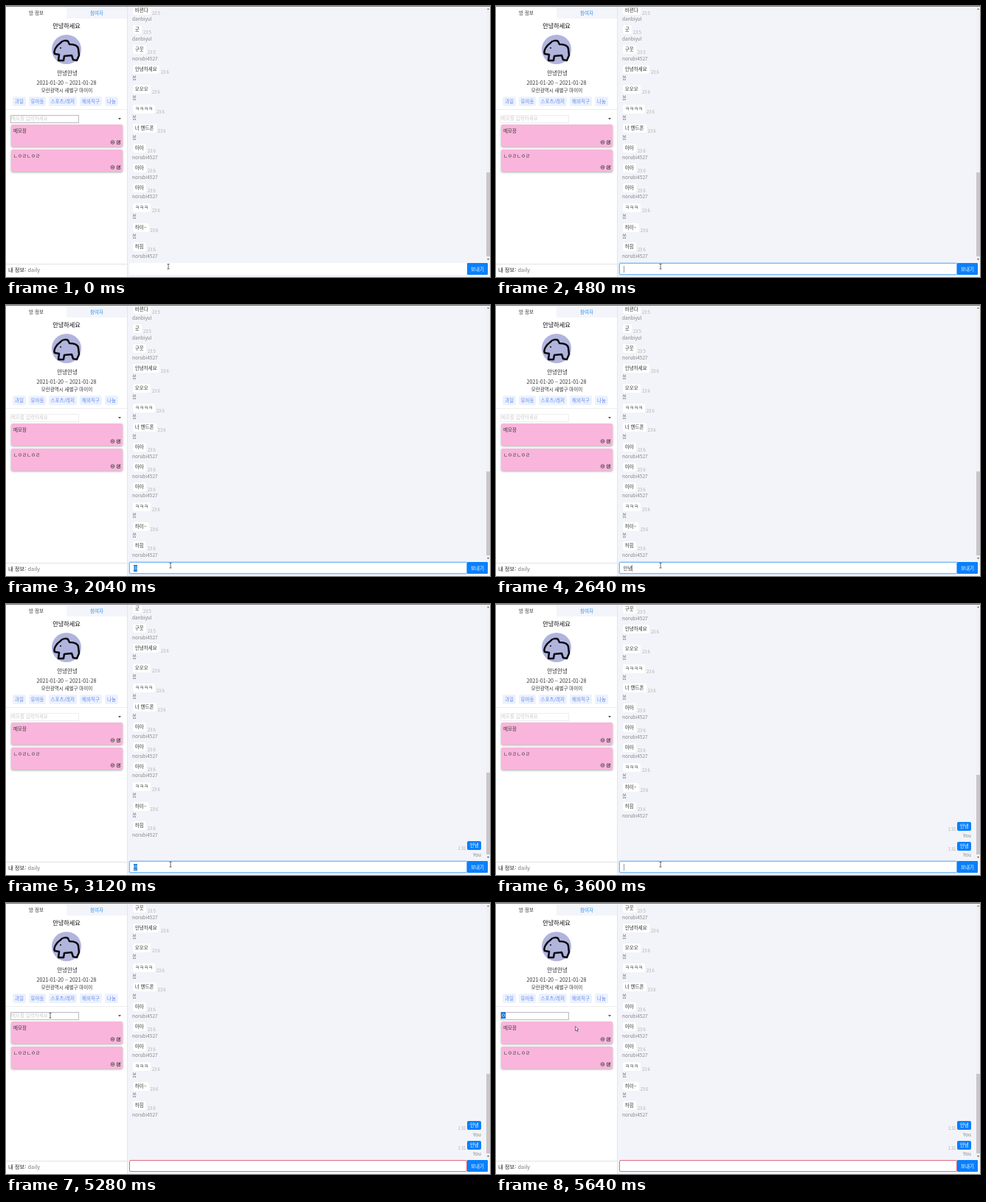
Animation of 656 by 368 pixels, one loop 5.76 s. Source, as an HTML page:

```html
<!DOCTYPE html>
<html lang="ko">
<head>
<meta charset="utf-8">
<title>Chat room</title>
<style>
html, body { margin: 0; width: 100%; height: 100%; overflow: hidden; background: #fff; }
#stage { position: relative; width: 656px; height: 368px; overflow: hidden; background: #fff;
  font: 6.5px/11px "Noto Sans CJK KR", "Noto Sans CJK", "Noto Sans", sans-serif; color: #333; }
#stage div, #stage svg { position: absolute; box-sizing: border-box; white-space: pre; }
#stage .mid { transform: translateX(-50%); }
.tag { height: 13px; padding: 0 3px; border-radius: 2px; background: #ecf2fe; color: #6489ec; line-height: 12px; }
.memo { left: 7px; width: 151px; height: 30px; background: #f9b5db; border-radius: 2px; box-shadow: 0 1px 3px #0005; }
#chat { left: 165px; top: 1px; width: 486px; height: 346px; overflow: hidden; }
#list { left: -165px; top: -1px; width: 656px; height: 400px; }
.bubble { height: 12px; padding: 0 3.3px; background: #fff; border-radius: 2px; box-shadow: 0 0 1px #0001; }
#stage .line { position: absolute; display: flex; left: 171.5px; height: 12px; }
#stage .line > div { position: static; }
.time { font-size: 5.5px; line-height: 20px; color: #aaa; margin: 0 2px; }
.name { left: 171px; color: #858585; }
#stage .own { left: auto; right: 12px; flex-direction: row-reverse; }
.own .bubble { background: #0a80fb; color: #fff; }
.name.own { left: auto; right: 12px; }
#field { left: 167px; top: 349px; width: 458px; height: 16px; border: 1px solid #fff; border-radius: 2px; background: #fff; }
#stage .sel { background: #1979d2; color: #fff; }
#stage .caret { border-right: 1px solid #999; }
#memoBox { left: 6px; top: 147.5px; width: 93px; height: 11px; border: 1px solid #eee; }
</style>
</head>
<body>
<div id="stage"></div>
<script>
const LOOP = 5760, STEP = 120;
const stage = document.getElementById('stage');

function add(parent, cls, text = '', css = {}) {
  const el = document.createElement('div');
  el.className = cls;
  el.textContent = text;
  for (const k in css) el.style[k] = typeof css[k] === 'number' ? css[k] + 'px' : css[k];
  parent.append(el);
  return el;
}
const rect = (left, top, width, height, background) => add(stage, '', '', { left, top, width, height, background });
const label = (text, left, y, css = {}, cls = '') => add(stage, cls, text, { left, top: y - 6, ...css });
function draw(x, y, w, h, body) {
  const holder = add(stage, '', '', { left: x, top: y });
  holder.innerHTML = `<svg width="${w}" height="${h}" style="overflow:visible" fill="none">${body}</svg>`;
  return holder;
}

// Side panel
rect(82, 0, 82, 17, '#f3f5fa');
label('방 정보', 41, 9.5, {}, 'mid');
label('참여자', 123, 9.5, { color: '#3595ee' }, 'mid');
label('안녕하세요', 82, 26.5, { fontSize: 8.2, fontWeight: 500, color: '#111' }, 'mid');
draw(62, 39, 40, 40, `<circle cx="20" cy="20" r="20" fill="#b1b4dc"/>
  <path d="M12 11C14 8 20 7 22 9L24 13C30 13 35 14 36 19L37 28L34 35L29 34L27 28L17 29L16 35H9L10 27L4 26C2 22 6 15 12 11"
   stroke="#0b0b10" stroke-width="2.5" stroke-linejoin="round" stroke-linecap="round"/>
  <circle cx="12" cy="18" r="1" fill="#0b0b10"/>`);
label('안녕안녕', 83, 91, { fontSize: 7.5 }, 'mid');
label('2021-01-20 ~ 2021-01-28', 82, 105, { fontSize: 7.1 }, 'mid');
label('모란광역시 새별구 마이이', 82.5, 115, {}, 'mid');
[['과일', 9], ['유아동', 30.5], ['스포츠/레저', 57.5], ['해외직구', 100], ['나눔', 134]]
  .forEach(([text, left]) => add(stage, 'tag', text, { left, top: 123 }));
rect(0, 140, 164, 1, '#eee');

const memoBox = add(stage, '', '');
memoBox.id = 'memoBox';
const memoText = label('', 7, 153);
draw(151.5, 151.8, 4, 3, '<path d="M0 0H4L2 2.5Z" fill="#555"/>');

[['메모장', 161], ['ㄴㅇㄹㄴㅇㄹ', 195]].forEach(([text, top]) => {
  add(stage, 'memo', '', { top });
  label(text, 10, top + 8.5);
  draw(141, top + 20.5, 15, 6, `<g stroke="#444" stroke-width=".8"><circle cx="3.5" cy="3" r="2.4"/>
    <path d="M2.5 2L4.5 4M4.5 2L2.5 4M12.5 1H9.5V5.5H13.5V3"/><path d="M11 4L14 .7" stroke-width="1.3"/></g>`);
});
rect(0, 350, 164, 1, '#e2e2e2');
label('내 정보:', 3, 359, { fontSize: 7.3, color: '#222' });
label('daily', 29.5, 359, { fontSize: 7.3, color: '#777' });

// Chat
rect(164, 0, 492, 368, '#f2f4f9');
rect(164, 0, 1, 368, '#e3e5ea');
const chat = add(stage, '');
chat.id = 'chat';
const list = add(chat, '');
list.id = 'list';

function message(text, time, name, y, own = '') {
  const line = add(list, 'line ' + own, '', { top: y - 6 });
  add(line, 'bubble', text);
  add(line, 'time', time);
  add(list, 'name ' + own, name, { top: y + 6.5 });
}
const users = { a: 'danbiyul', b: 'norubi4527', c: '봄' };
const texts = ['바뀐다', '굿', '구웃', '안녕하세요', '오오오', 'ㅋㅋㅋㅋ', '너 핸드폰',
  '아아', '아아', '아아', 'ㅋㅋㅋ', '하이~', '하힘'];
texts.forEach((text, i) =>
  message(text, i < 3 ? '23:5' : '23:6', users['aabccccbbbccb'[i]], 5.5 + i * 26.83));
[354, 380.5].forEach(y => message('안녕', '1:31', 'You', y, 'own'));

rect(651, 1, 5, 346, '#f1f1f3');
const thumb = rect(651, 226, 5, 114, '#c9c5c9');
draw(652, 2.5, 3, 2, '<path d="M0 2H3L1.5 0Z" fill="#777"/>');
draw(652, 342.5, 3, 2, '<path d="M0 0H3L1.5 2Z" fill="#555"/>');

const field = add(stage, '');
field.id = 'field';
const fieldText = label('', 172.5, 357.5);
rect(625, 349, 28, 16, '#0a80fb').style.borderRadius = '1px';
label('보내기', 639, 357.5, { color: '#fff' }, 'mid');
rect(0, 0, 656, 1, '#77777c');

const beam = draw(0, 0, 4, 8, '<path d="M.5 .5H3.5M2 .5V7M.5 7H3.5" stroke="#444" stroke-width=".8"/>');
const arrow = draw(0, 0, 6, 8,
  '<path d="M.5 .5V6.5L2 5.2L3 7.5L4 7L3 4.8H5Z" fill="#fff" stroke="#444" stroke-width=".7"/>');

// Timeline
const CHAT_CLICK = 360, MEMO_CLICK = 5160;
const sends = [2880, 3480];
const typing = [[0, ''], [360, '', 'caret'], [720, 'd', 'caret'], [840, 'dk', 'caret'],
  [1320, 'd', 'caret'], [1440, '', 'caret'], [1800, 'ㅇ', 'sel'], [1920, '아', 'sel'],
  [2160, '안', 'sel'], [2280, '안ㄴ', 'caret'], [2400, '안녀', 'caret'], [2520, '안녕', 'caret'],
  [2880, '', 'caret'], [3000, 'ㅇ', 'sel'], [3120, '안', 'sel'], [3240, '안녀', 'caret'],
  [3360, '안녕', 'caret'], [3480, '', 'caret'], [MEMO_CLICK, '']];
const memoTyping = [[0, '메모를 입력하세요', 'hint'], [5400, 'ㅇ', 'sel']];
const path = [[0, 220, 354], [480, 223, 354], [3840, 223, 354], [4440, 84, 185], [4680, 84, 185],
  [5040, 60, 153], [5280, 60, 153], [5520, 108, 170], [LOOP, 108, 170]];

const current = (table, t) => table.filter(row => row[0] <= t).pop();

function pointAt(t) {
  const i = path.findIndex(p => p[0] > t);
  const [a, b] = [path[i - 1], path[i]];
  const k = (t - a[0]) / (b[0] - a[0]);
  return [a[1] + (b[1] - a[1]) * k, a[2] + (b[2] - a[2]) * k];
}

function show(el, [, text, mode = '']) {
  const boxed = mode === 'sel' || mode === 'caret';
  el.textContent = text;
  el.className = mode;
  el.style.color = mode === 'hint' ? '#ccc' : '';
  el.style.lineHeight = boxed ? '9px' : '11px';
  el.style.marginTop = boxed ? '1px' : '0';
  el.style.minHeight = '9px';
}

function render(now) {
  const t = Math.floor(now % LOOP / STEP) * STEP;
  const sent = sends.filter(s => s <= t).length;
  list.style.transform = `translateY(${-26 * sent}px)`;
  thumb.style.top = 226 + 3 * sent + 'px';
  thumb.style.height = 114 - 3 * sent + 'px';

  const focused = t >= CHAT_CLICK && t < MEMO_CLICK;
  field.style.borderColor = focused ? '#7ab8f6' : t < CHAT_CLICK ? '#fff' : '#dc6b80';
  field.style.boxShadow = focused ? '0 0 1px 1px #bfdcfb' : 'none';
  memoBox.style.borderColor = focused ? '#eee' : '#bbb';
  show(fieldText, current(typing, t));
  show(memoText, current(memoTyping, t));

  const [x, y] = pointAt(t);
  const overInput = y > 348 || (x < 99 && y > 147 && y < 159);
  beam.style.display = overInput ? '' : 'none';
  arrow.style.display = overInput ? 'none' : '';
  beam.style.transform = `translate(${x - 2}px, ${y - 4}px)`;
  arrow.style.transform = `translate(${x - 1}px, ${y - 3}px)`;
}

const start = performance.now();
function tick() {
  render(performance.now() - start);
  requestAnimationFrame(tick);
}
tick();
</script>
</body>
</html>
```
